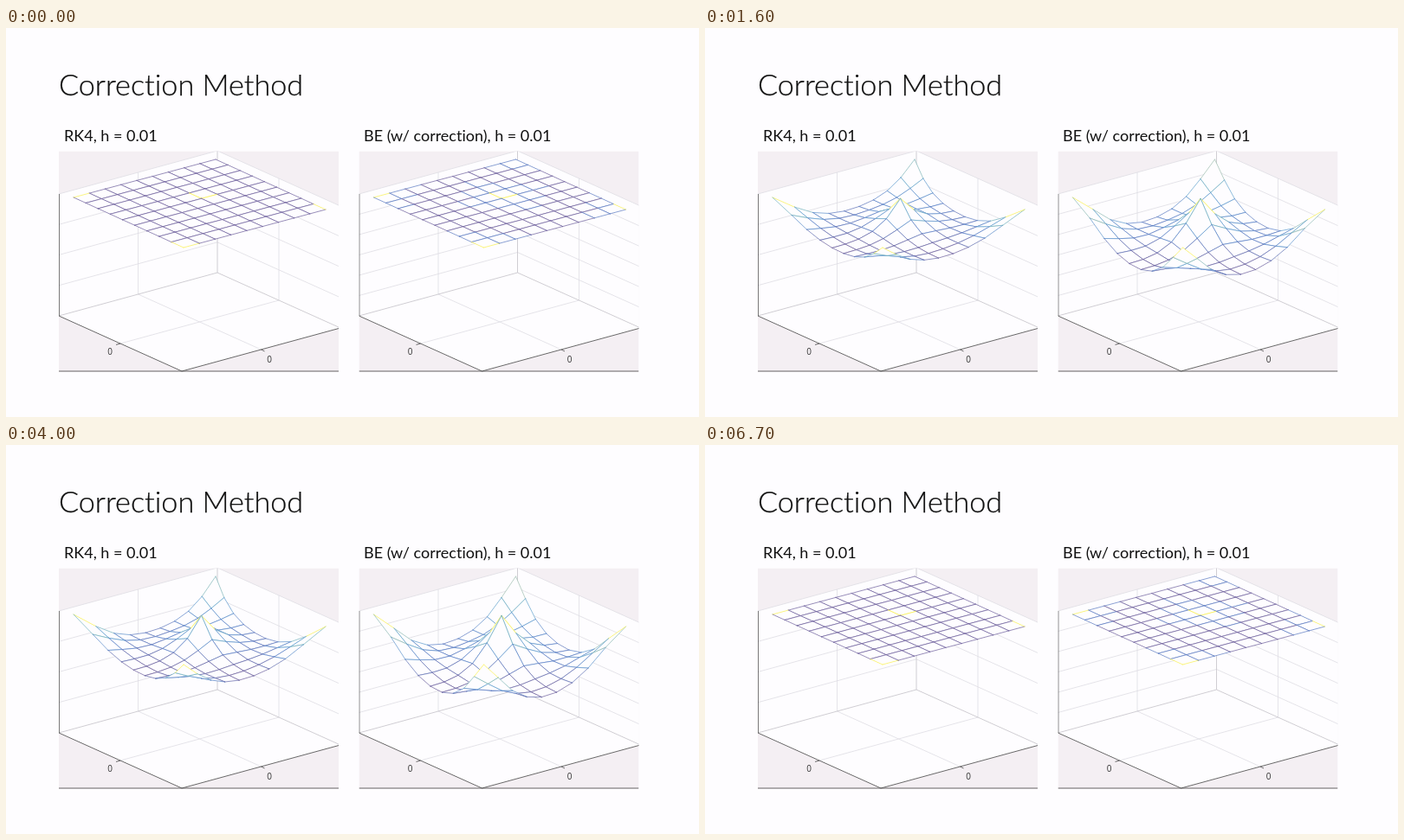
An HTML page that plays this animation: 800 px wide and 450 px high, repeating every 6.8 s.

```html
<!DOCTYPE html>
<html lang="en">
<head>
<meta charset="utf-8">
<title>Correction Method</title>
<style>
  html, body { margin: 0; width: 100%; height: 100%; overflow: hidden; background: #fefdff; }
  svg { display: block; width: 800px; height: 450px; }
  text { font-family: Lato, Carlito, "Open Sans", sans-serif; font-variant-ligatures: none; fill: #111; }
  .title { font-size: 34.2px; font-weight: 300; stroke: #111; stroke-width: .25; }
  .label { font-size: 18px; }
  .tick { font: 10px "Open Sans", Roboto, sans-serif; text-anchor: middle; fill: #333; }
  .mesh { stroke-width: .72; stroke-linecap: round; }
</style>
</head>
<body>
<svg viewBox="0 0 800 450">
  <defs><clipPath id="frame"><rect x="61" y="142.5" width="323" height="255.5"/></clipPath></defs>
  <rect width="800" height="450" fill="#fefdff"/>
  <text class="title" x="61" y="78">Correction Method</text>
  <text class="label" x="67" y="131">RK4, h = 0.01</text>
  <text class="label" x="413" y="131">BE (w/ correction), h = 0.01</text>
  <g id="left"></g>
  <g id="right" transform="translate(346.5 0)"></g>
</svg>
<script>
const LOOP = 6800, STEP = 100, N = 10;
const WHITE = '#fefdff';
const el = id => document.getElementById(id);
const lerp = (a, b, f) => a + (b - a) * f;

// Axes box: a and b run from 0 to 1 along the floor, h is the height in pixels.
const boxPoint = (a, b, h) =>
  [61 + 183 * a + 142 * b, 333 - 50 * a + 64 * b - h].map(n => n.toFixed(1)).join();
const line = (from, to, color, width = .8) =>
  `<path d="M${from}L${to}" stroke="${color}" stroke-width="${width}" fill="none"/>`;
const area = (points, color) => `<polygon points="${points.join(' ')}" fill="${color}"/>`;

function axes(levels) {
  const top = 141, grid = '#dfdde4', back = '#c4c2c8', dark = '#444';
  const p = boxPoint;
  let s = '<rect x="61" y="142.5" width="323" height="255.5" fill="#f4eff3"/>';
  s += area([p(0, 0, 0), p(0, 0, top), p(1, 0, top), p(1, 1, top), p(1, 1, 0), p(0, 1, 0)], WHITE);
  for (let i = 1; i <= levels; i++) {
    const h = top * i / levels;
    s += line(p(0, 0, h), p(1, 0, h), grid) + line(p(1, 0, h), p(1, 1, h), grid);
  }
  s += line(p(.5, 0, 0), p(.5, 0, top), grid) + line(p(1, .5, 0), p(1, .5, top), grid);
  s += line(p(.5, 0, 0), p(.5, 1, 0), grid) + line(p(0, .5, 0), p(1, .5, 0), grid);
  s += line(p(1, 0, 0), p(1, 0, top), back);
  s += line(p(0, 0, 0), p(1, 0, 0), back) + line(p(1, 0, 0), p(1, 1, 0), back);
  s += line(p(0, 0, 0), p(0, 1, 0), dark) + line(p(0, 1, 0), p(1, 1, 0), dark);
  s += line('61.4,192', '61.4,333', dark) + line('61,397', '384,397', dark);
  s += line('132,365', '127,366.4', dark) + line('294.5,372', '298.5,374', dark);
  s += '<text class="tick" x="120" y="378">0</text><text class="tick" x="304" y="387">0</text>';
  return `<g clip-path="url(#frame)">${s}</g>`;
}

// Cloth: a square net held at its corners and near its centre.
const id = (u, v) => u * N + v;
const pinned = new Set([id(0, 0), id(0, 9), id(9, 0), id(9, 9), id(5, 4)]);
const flatNet = Array.from({ length: N * N }, (_, i) => [Math.floor(i / N), i % N, 0]);
const cells = flatNet.filter(([u, v]) => u < 9 && v < 9)
  .map(([u, v]) => [id(u, v), id(u + 1, v), id(u + 1, v + 1), id(u, v + 1)]);
const neighbours = flatNet.map(([u, v]) =>
  [[u - 1, v], [u + 1, v], [u, v - 1], [u, v + 1]]
    .filter(p => p.every(c => c >= 0 && c < N)).map(p => id(...p)));

// Fully slack net: every free knot sits at the mean of its neighbours, lowered by its weight.
function slackNet() {
  const net = flatNet.map(p => [...p]);
  for (let n = 0; n < 1500; n++) {
    net.forEach((p, i) => {
      if (pinned.has(i)) return;
      const around = neighbours[i];
      for (let k = 0; k < 3; k++) {
        const load = k === 2 ? 1 : 0;
        p[k] = (around.reduce((sum, j) => sum + net[j][k], 0) - load) / around.length;
      }
    });
  }
  const deepest = Math.min(...net.map(p => p[2]));
  return net.map(([u, v, z]) => [u, v, z / deepest]);
}
const slack = slackNet();

const project = ([u, v, z]) =>
  [78 + (164 * u + 127 * v) / 9, 196 + (58 * v - 44 * u) / 9 - 21.7 * z];
const nearness = ([u, v, z]) => .737 * v - .564 * u + .35 * z;

function sag(cloth, t) {
  const peak = .9;
  if (t < peak) return (cloth.rest + cloth.swing) * Math.sin(Math.PI / 2 * t / peak) ** 2;
  const s = t - peak;
  return cloth.rest + cloth.swing * Math.exp(-.645 * s) * Math.cos(Math.PI * s);
}

function netAt(cloth, t) {
  const depth = sag(cloth, t);
  const pull = cloth.pull * Math.tanh(depth);
  return flatNet.map(([u, v], i) => {
    const [su, sv, sz] = slack[i];
    return [lerp(u, su, pull), lerp(v, sv, pull), -depth * sz ** cloth.steepness];
  });
}

const ramp = [[112, 98, 158], [92, 128, 198], [98, 160, 208], [118, 180, 190], [196, 200, 165], [250, 241, 80]];
function shade(h) {
  const x = Math.min(.9999, Math.max(0, h)) * (ramp.length - 1);
  const i = Math.floor(x);
  return `rgb(${ramp[i].map((c, k) => Math.round(lerp(c, ramp[i + 1][k], x - i)))})`;
}

function flatHeight(cloth, i) {
  if (pinned.has(i)) return 1;
  return neighbours[i].some(j => pinned.has(j) || neighbours[j].some(n => pinned.has(n)))
    ? cloth.glow : 0;
}

function drawCloth(cloth, t, flat) {
  const net = flat ? flatNet : netAt(cloth, t);
  const depth = Math.min(...net.map(p => p[2]));
  const color = net.map((p, i) => shade(flat ? flatHeight(cloth, i) : 1 - p[2] / depth));
  const at = net.map(p => project(p).map(n => n.toFixed(1)).join());
  const near = cell => cell.reduce((sum, i) => sum + nearness(net[i]), 0);
  const order = cells.map(c => [near(c), c]).sort((a, b) => a[0] - b[0]);
  const edge = (from, to) => `<path d="M${at[from]}L${at[to]}" stroke="${color[from]}"/>`;
  cloth.mesh.innerHTML = order.map(([, [a, b, c, d]]) =>
    area([at[a], at[b], at[c], at[d]], WHITE) +
    edge(a, b) + edge(d, c) + edge(d, a) + edge(c, b)).join('');
}

const cloths = [
  { panel: 'left', levels: 4, rest: 2.1, swing: 1.15, pull: .25, steepness: 1.3, glow: 0 },
  { panel: 'right', levels: 6, rest: 2.95, swing: 1.25, pull: .17, steepness: 1.6, glow: .18 }
];
for (const cloth of cloths) {
  el(cloth.panel).innerHTML = axes(cloth.levels) + '<g class="mesh"></g>';
  cloth.mesh = el(cloth.panel).querySelector('.mesh');
}

let shown = -1;
function render(ms) {
  const step = Math.floor(ms % LOOP / STEP);
  if (step !== shown) {
    shown = step;
    const flat = step === 0 || step === LOOP / STEP - 1;
    cloths.forEach(cloth => drawCloth(cloth, step * STEP / 1000, flat));
  }
  requestAnimationFrame(render);
}
render(0);
</script>
</body>
</html>
```
